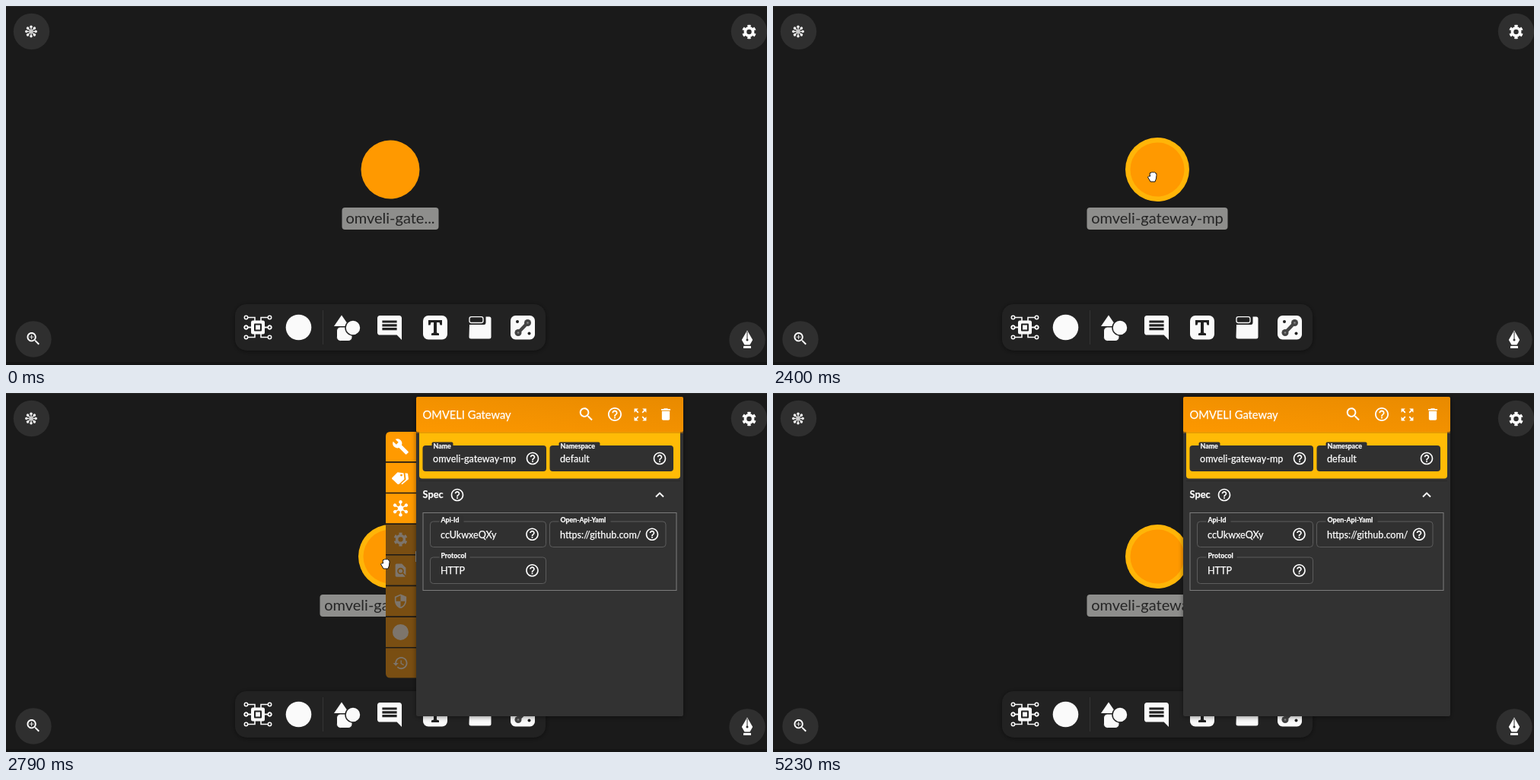
An HTML page that plays this animation: 1000 by 472 pixels, repeating every 5.33 s.

```html
<!DOCTYPE html>
<html lang="en">
<head>
<meta charset="utf-8">
<title>Design canvas</title>
<style>
  html, body { margin: 0; width: 100%; height: 100%; overflow: hidden; background: #1a1a1a; }
  svg { display: block; width: 100vw; height: 100vh; font-family: Lato, sans-serif; }
  .panel text { fill: #fff; stroke: #fff; stroke-width: .25px; }
</style>
</head>
<body>
<svg id="stage" viewBox="0 0 1000 472"></svg>
<script>
const LOOP = 5330, DARK = '#202020', PANEL = '#303030';
const LABEL = 'omveli-gateway-mp';

// Icon outlines on a 24-unit grid
const lens = 'M15.5 14h-.79l-.28-.27C15.41 12.59 16 11.11 16 9.5 16 5.91 13.09 3 9.5 3S3 5.91 3 9.5 5.91 16 9.5 16c1.61 0 3.09-.59 4.23-1.57l.27.28v.79l5 4.99L20.49 19zm-6 0C7.01 14 5 11.99 5 9.5S7.01 5 9.5 5 14 7.01 14 9.5 11.99 14 9.5 14z';
const shapes = {
  search: lens,
  zoom: lens + 'M12.5 10H10v2.5H9V10H6.5V9H9V6.5h1V9h2.5z',
  help: 'M11 18h2v-2h-2zm1-16C6.48 2 2 6.48 2 12s4.48 10 10 10 10-4.48 10-10S17.52 2 12 2zm0 18c-4.41 0-8-3.59-8-8s3.59-8 8-8 8 3.59 8 8-3.59 8-8 8zm0-14c-2.21 0-4 1.79-4 4h2c0-1.1.9-2 2-2s2 .9 2 2c0 2-3 1.75-3 5h2c0-2.25 3-2.5 3-5 0-2.21-1.79-4-4-4z',
  expand: 'M15 3l2.3 2.3-2.9 2.9 1.4 1.4 2.9-2.9L21 9V3zM3 9l2.3-2.3 2.9 2.9 1.4-1.4-2.9-2.9L9 3H3zm6 12l-2.3-2.3 2.9-2.9-1.4-1.4-2.9 2.9L3 15v6zm12-6l-2.3 2.3-2.9-2.9-1.4 1.4 2.9 2.9L15 21h6z',
  trash: 'M6 19c0 1.1.9 2 2 2h8c1.1 0 2-.9 2-2V7H6zM19 4h-3.5l-1-1h-5l-1 1H5v2h14z',
  comment: 'M22 4c0-1.1-.9-2-2-2H4c-1.1 0-2 .9-2 2v12c0 1.1.9 2 2 2h14l4 4zM18 14H6v-2h12zm0-3H6V9h12zm0-3H6V6h12z',
  wrench: 'M22.7 19l-9.1-9.1c.9-2.3.4-5-1.5-6.9-2-2-5-2.4-7.4-1.3L9 6 6 9 1.6 4.7C.4 7.1.9 10.1 2.9 12.1c1.9 1.9 4.6 2.4 6.9 1.5l9.1 9.1c.4.4 1 .4 1.4 0l2.3-2.3c.5-.4.5-1.1.1-1.4z',
  tags: 'M1 12L8 5l8 1 1 8-7 6.5c-.7.6-1.4.6-2 0L1 14c-.6-.7-.6-1.300 0-2zM13 7.500a1.400 1.400 0 1 0 .01 0zM18 6l3.500.5 1 7.500-8.500 7-1.200-1 6.200-5.500z',
  page: 'M20 19.6V8l-6-6H6c-1.1 0-2 .9-2 2v16c0 1.1.9 2 2 2h12c.4 0 .8-.1 1.2-.4l-4.4-4.4c-.8.5-1.8.8-2.8.8-2.8 0-5-2.2-5-5s2.2-5 5-5 5 2.2 5 5c0 1-.3 2-.8 2.8zM9 13a3 3 0 1 0 6 0 3 3 0 1 0-6 0z',
  shield: 'M12 1L3 5v6c0 5.55 3.84 10.74 9 12 5.16-1.26 9-6.45 9-12V5zm0 11h7c-.5 4.1-3.3 7.8-7 8.9V12H5V6.3l7-3.1z',
  history: 'M13 3c-5 0-9 4-9 9H1l4 4 4-4H6c0-3.9 3.1-7 7-7s7 3.1 7 7-3.1 7-7 7c-1.9 0-3.7-.8-4.9-2.1l-1.4 1.4C8.3 20 10.5 21 13 21c5 0 9-4 9-9s-4-9-9-9zm-1 5v5l4.3 2.5.7-1.2-3.5-2.1V8z'
};

const rect = (x, y, x2, y2, r, fill, extra = '') =>
  `<rect x="${x}" y="${y}" width="${x2 - x}" height="${y2 - y}" rx="${r}" fill="${fill}" ${extra}/>`;
const dot = (x, y, r, fill, extra = '') => `<circle cx="${x}" cy="${y}" r="${r}" fill="${fill}" ${extra}/>`;
const ring = (x, y, r, color, width, extra = '') => dot(x, y, r, 'none', `stroke="${color}" stroke-width="${width}" ${extra}`);
const path = (d, fill, extra = '') => `<path d="${d}" fill="${fill}" ${extra}/>`;
const line = (d, color, width = 1) => path(d, 'none', `stroke="${color}" stroke-width="${width}"`);
const text = (x, y, size, str, extra = '') => `<text x="${x}" y="${y}" font-size="${size}" ${extra}>${str}</text>`;
const place = (x, y, s, body) => `<g transform="translate(${x} ${y}) scale(${s})">${body}</g>`;
const icon = (name, x, y, s, fill = '#fff') =>
  place(x, y, s, path(shapes[name], fill, 'fill-rule="evenodd" transform="translate(-12 -12)"'));
const gear = (x, y, s, fill) => place(x, y, s, ring(0, 0, 5.5, fill, 4) +
  ring(0, 0, 8.4, fill, 3.2, 'pathLength="12" stroke-dasharray="1 1" stroke-dashoffset=".5" transform="rotate(30)"'));
const spokes = (n, body) => Array.from({ length: n }, (_, i) =>
  `<g transform="rotate(${i * 360 / n})">${body}</g>`).join('');
const polar = (r, deg) => [r * Math.cos(deg * Math.PI / 180), r * Math.sin(deg * Math.PI / 180)];

function corners() {
  return [[33.5, 33.5], [976.5, 33.5], [36, 438], [974, 439]].map(([x, y]) => dot(x, y, 23.7, '#2f2f2f')).join('') +
    place(33, 33.5, 1, spokes(8, line('M0-2V-6', '#ddd', 1.5) + dot(0, -6.2, 1.8, '#eee')) + dot(0, 0, 2.5, '#ccc')) +
    gear(976.5, 34, .93, '#fff') + icon('zoom', 36, 437.5, .94) +
    path('M974 426.5L981.2 439 977.5 445.5H970.5L966.8 439z', '#fff') +
    line('M974 428V438', '#2f2f2f') + dot(974, 439, 1.5, '#2f2f2f') + rect(969, 447, 979, 450, .5, '#fff');
}

function toolbar() {
  const W = '#fafafa', GREY = '#444';
  const arm = line('M-4-8V-13H-13M-8 0H-13', W, 1.6) + ring(-15.5, -13, 2.2, W, 1.5) + ring(-15.5, 0, 2.2, W, 1.5);
  const chip = [[1, 1], [-1, 1], [1, -1], [-1, -1]].map(([a, b]) => `<g transform="scale(${a} ${b})">${arm}</g>`).join('') +
    rect(-9, -9, 9, 9, 2.5, W) + rect(-5, -5, 5, 5, 1, DARK) + rect(-3, -3, 3, 3, 0, W);
  return rect(301, 392, 709, 453, 15, '#212121', 'filter="url(#soft)"') + line('M416.5 400V445', '#343434') +
    place(331, 422.5, 1, chip) + dot(384.5, 422.5, 16.8, W) +
    path('M441 406.5L451 421H431z', W) +
    rect(434.5, 422, 455, 440.5, 5, W, `stroke="${DARK}"`) +
    dot(456, 423, 10, W, `stroke="${DARK}" stroke-width="1.5"`) +
    icon('comment', 504, 423, 1.6, W) +
    rect(548, 407, 580, 438.5, 7, W) +
    path('M555 413H573V419.5H570.5L569.5 416H566V429.5L569 430.5V433H559V430.5L562 429.5V416H558.5L557.5 419.5H555z', DARK) +
    path('M609 419H628Q630.5 419 630.5 416V408.5H635Q637.5 408.5 637.5 411V435Q637.5 437.5 635 437.5H611Q608.5 437.5 608.5 435z', W) +
    rect(609, 408.7, 627, 416.5, 2.5, 'none', `stroke="${W}" stroke-width="1.3"`) +
    rect(663, 407, 695, 438.5, 6.5, W) + line('M673 429.5L685.5 416.5', GREY, 4.5) +
    dot(673, 429.5, 4.5, GREY) + dot(685.5, 416.5, 4.5, GREY) + dot(673, 429.5, 1.3, '#888') + dot(685.5, 416.5, 1.3, '#888') +
    dot(672, 415, 2, DARK) + dot(687.5, 430.5, 2, DARK);
}

function tabs() {
  const OFF = '#7d756c';
  const hub = spokes(6, line('M0 0V-8', '#fff', 1.5) + dot(0, -8.5, 2.2, '#fff')) + dot(0, 0, 3.7, '#fff');
  const glyphs = [icon('wrench', 0, 0, .94), icon('tags', 0, 0, 1), hub, gear(0, 0, .9, OFF),
    icon('page', 0, 0, .86, OFF), icon('shield', 0, 0, .85, OFF), dot(0, 0, 10.5, OFF), icon('history', 0, 0, .9, OFF)];
  return rect(499, 60, 539, 365, 0, '#1d1a16') + glyphs.map((glyph, i) => {
    const y = 51 + i * 40.65, top = i ? 0 : 6, low = i === 7 ? 6 : 0;
    return path(`M539 ${y}H${499 + top}q${-top} 0 ${-top} ${top}V${y + 39 - low}q0 ${low} ${low} ${low}H539z`,
      i < 3 ? '#ff9a00' : '#794e12') + place(518.5, y + 19.5, 1, glyph);
  }).join('') + rect(538, 208, 539.5, 222, 0, '#888');
}

function field(x, y, x2, y2, label, labelWidth, value, labelDrop, attrs) {
  const base = y + labelDrop;
  return rect(x, y, x2, y2, 4, PANEL, attrs) + rect(x + 12, base - 8.5, x + 17 + labelWidth, base + 2.5, 2, PANEL) +
    text(x + 14, base, 8.8, label, 'font-weight="700"') +
    text(x + 13.5, y + 21.5, 12.6, value) + icon('help', x2 - 18, (y + y2) / 2, .83);
}

function panel() {
  const edge = 'stroke="#5c5c5c"';
  const arcs = [[-30, 11], [17, 72], [80, 139], [146, 193], [200, 261]].map(([a, b], i) =>
    line(`M${polar(32, a)}A32 32 0 0 1 ${polar(32, b)}`, i % 2 ? '#00a594' : '#00b8a4', 8)).join('');
  const chevrons = line('M2-31L8-25 2-19M15-31L21-25 15-19', '#00b8a4', 2.8);
  return rect(539, 5, 890, 425, 2, PANEL, 'filter="url(#soft)"') +
    rect(543, 48, 886, 112.5, 4, '#ffbb06') + rect(539, 5, 890, 51.5, 2, 'url(#head)') +
    rect(539, 51.5, 890, 53, 0, '#c87800', 'opacity=".5"') +
    text(547.5, 33.5, 14.7, 'OMVELI Gateway') +
    icon('search', 762.5, 28, .97) + icon('help', 800, 28, .9) + icon('expand', 833.5, 28.5, .88) + icon('trash', 867, 28, .86) +
    `<g id="spinner">${place(714, 251, 1, arcs + chevrons)}</g><g id="form">` +
    field(547.5, 69, 710, 103, 'Name', 23, LABEL, 4) +
    field(714.5, 69, 877, 103, 'Namespace', 49, 'default', 4) +
    line('M543 115.5H886', '#292929') +
    text(547.5, 137.5, 12.8, 'Spec', 'font-weight="700"') + icon('help', 593, 134, .83) +
    line('M854 136.5L859 131.5 864 136.5', '#fff', 1.9) +
    rect(548, 157.5, 881, 259.5, 0, 'none', 'stroke="#7c7c7c"') +
    field(557.5, 169, 709.5, 202.5, 'Api-Id', 27, 'ccUkwxeQXy', 1, edge) +
    field(714.5, 169, 867, 202.5, 'Open-Api-Yaml', 63, 'https://github.com/', 1, edge) +
    field(557.5, 216, 709.5, 250.5, 'Protocol', 35, 'HTTP', 1, 'id="protocol"') + '</g>';
}

const ink = 'stroke="#111" stroke-linejoin="round"';
document.getElementById('stage').innerHTML = `
  <defs>
    <filter id="soft"><feDropShadow dx="0" dy="1" stdDeviation="3" flood-opacity=".45"/></filter>
    <linearGradient id="head" x1="0" y1="1" x2="1" y2="0"><stop stop-color="#fd9800"/><stop offset="1" stop-color="#e88a00"/></linearGradient>
  </defs>` +
  rect(0, 0, 1000, 472, 0, '#1a1a1a') + rect(0, 0, 1000, 1, 0, '#292929') + rect(0, 468, 1000, 472, 0, '#151515') +
  corners() + toolbar() +
  dot(505, 215, 42, '#ffb508', 'id="halo"') + dot(505, 215, 38.5, '#ff9900', 'id="node"') +
  rect(441.5, 265, 568.5, 294, 4, '#8e8e8c', 'id="plate"') +
  text(505, 286, 20, '', 'id="label" text-anchor="middle" fill="#252525"') +
  `<g id="tabs">${tabs()}</g><g id="panel" class="panel">${panel()}</g>` +
  `<g id="cursor">` +
  path('M-2 1.5Q0-1.5 2 1.5V6.5L8 8.5Q9.5 9 9 11L7.5 17H-1.5L-6 10.5Q-5.5 8-2 10.5z', '#fff', ink + ' id="point"') +
  path('M-4-4Q-3-6-2-4.5Q-1-7 .5-5Q2-7 3-4.5Q5.5-5 5-1.5L4.5 3 3 7H-3L-6.5 1Q-5.5-1-3.5 0z', '#fff', ink + ' id="grab"') +
  `</g>`;

const el = Object.fromEntries([...document.querySelectorAll('[id]')].map(e => [e.id, e]));
const show = (e, on) => e.setAttribute('visibility', on ? 'inherit' : 'hidden');

// Pointer positions held from each time: [ms, x, y]
const track = [[1240, 523, 452], [1350, 519, 425], [1460, 514, 385], [1650, 510, 340], [1730, 505, 290],
  [1810, 501, 248], [1900, 499, 224], [3200, 530, 227], [3300, 575, 230]];

function draw(t) {
  const selected = t >= 2320, loading = t < 2790;
  show(el.halo, selected);
  el.node.setAttribute('r', selected ? 35.5 : 38.5);
  el.label.textContent = selected ? LABEL : LABEL.slice(0, 11) + '...';
  const half = selected ? 92.5 : 63.5;
  el.plate.setAttribute('x', 505 - half);
  el.plate.setAttribute('width', half * 2);

  show(el.panel, t >= 2650);
  el.panel.setAttribute('transform', `translate(539 214.5) scale(${t < 2700 ? 1.117 : 1}) translate(-539 -214.5)`);
  show(el.spinner, loading);
  show(el.form, !loading);
  show(el.tabs, !loading && t < 5230);
  el.protocol.setAttribute('stroke', t >= 3600 && t < 4710 ? '#fff' : '#5c5c5c');

  const spot = track.filter(k => k[0] <= t).pop();
  show(el.cursor, spot && t < 3400);
  if (spot) el.cursor.setAttribute('transform', `translate(${spot[1]} ${spot[2]})`);
  show(el.point, t < 1650);
  show(el.grab, t >= 1650);
}

function tick() {
  draw(performance.now() % LOOP);
  requestAnimationFrame(tick);
}
tick();
</script>
</body>
</html>
```
